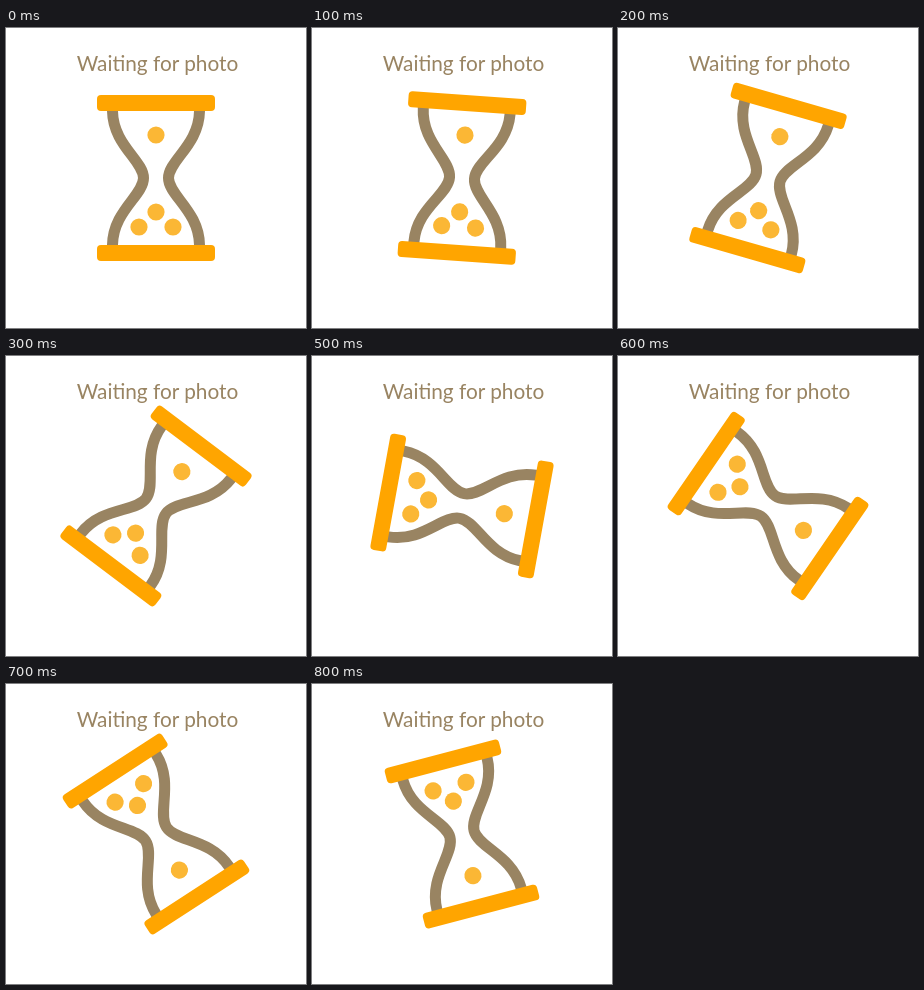
These frames come from a looping animation (300 by 300 pixels, 900 ms). An HTML page:

```html
<!DOCTYPE html>
<html lang="en">
<head>
<meta charset="utf-8">
<title>Waiting for photo</title>
<style>
  html, body { margin: 0; width: 100%; height: 100%; overflow: hidden; background: #fff; }
  svg { display: block; width: 100vw; height: 100vh; }
  text { font: 400 20.8px Lato, sans-serif; fill: #998462; text-anchor: middle; }
  .glass { fill: none; stroke: #998462; stroke-width: 11; }
  .bar { fill: #ffa500; }
  .sand { fill: #fbb735; }
</style>
</head>
<body>
<svg viewBox="0 0 300 300">
  <text x="151.5" y="43">Waiting for photo</text>
  <g id="hourglass">
    <g class="glass">
      <path d="M106.5 80V83C107 117 137.5 132.5 137.5 150S107 183 106.5 217V220"/>
      <path d="M193.5 80V83C193 117 162.5 132.5 162.5 150S193 183 193.5 217V220"/>
    </g>
    <g class="bar">
      <rect x="91" y="67" width="118" height="16" rx="4"/>
      <rect x="91" y="217" width="118" height="16" rx="4"/>
    </g>
    <g class="sand">
      <circle cx="150" cy="107" r="8.6"/>
      <circle cx="150" cy="184" r="8.6"/>
      <circle cx="133" cy="199" r="8.6"/>
      <circle cx="167" cy="199" r="8.6"/>
    </g>
  </g>
</svg>
<script>
  // Eased half turn, held in discrete steps; the loop snaps back upright.
  const STEP_MS = 100;
  const ANGLES = [0, 4, 16, 37, 66, 100.3, 124.5, 147, 165.3];
  const hourglass = document.getElementById('hourglass');

  function draw(now) {
    const step = Math.floor(now / STEP_MS) % ANGLES.length;
    hourglass.setAttribute('transform', `rotate(${ANGLES[step]} 150 150)`);
    requestAnimationFrame(draw);
  }
  draw(performance.now());
</script>
</body>
</html>
```
